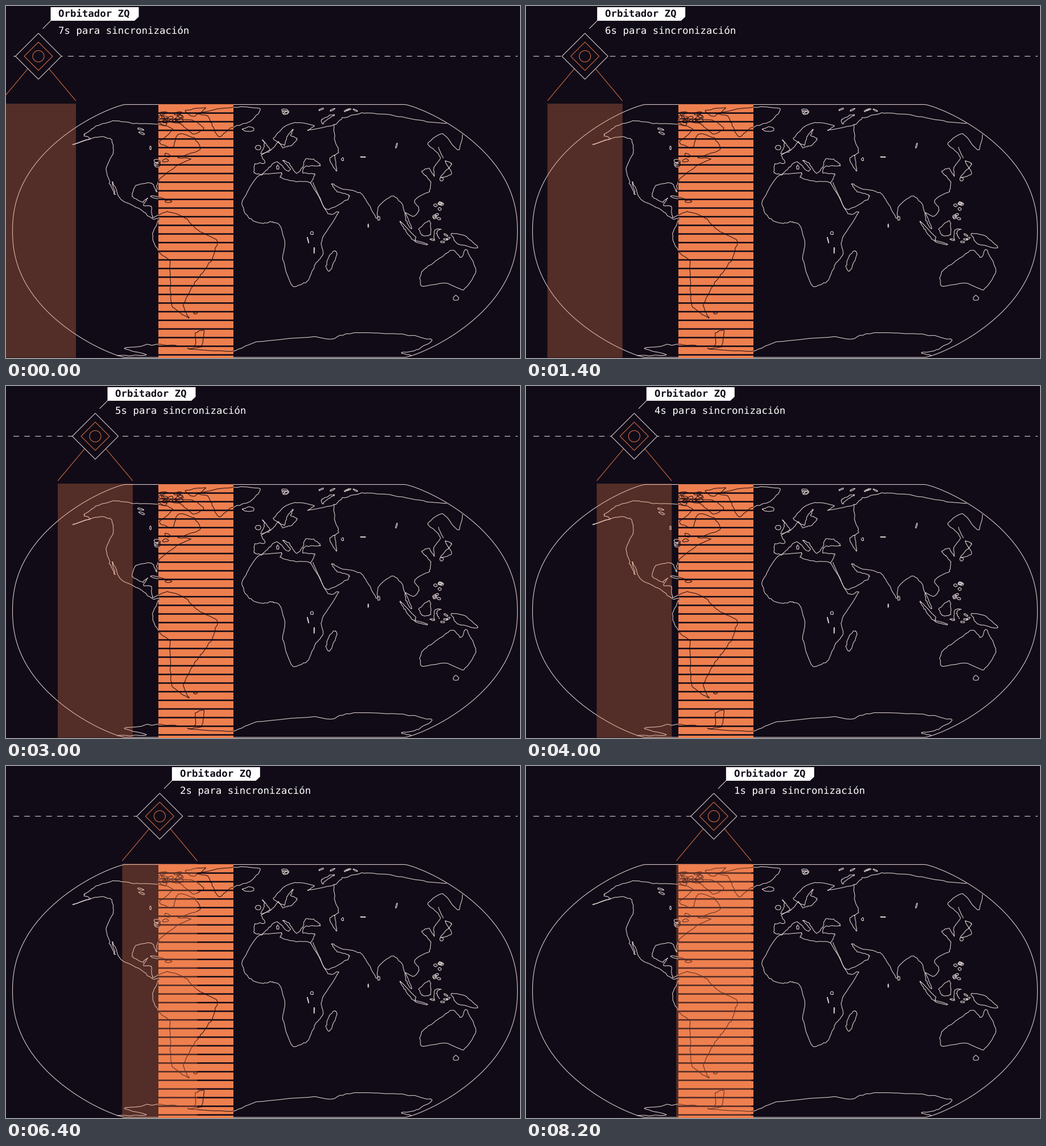
A matplotlib script that plays this animation: 904x620 px, repeating every 8400 ms.

```python
import numpy as np
import matplotlib.pyplot as plt
from matplotlib.animation import FuncAnimation
from matplotlib.collections import LineCollection
from matplotlib.patches import Circle, Polygon, Rectangle
from matplotlib.transforms import Affine2D

W, H, DPI = 904, 620, 64
FRAMES, STEP_MS = 42, 200
SPEED = 20 / 3            # pixels per frame
START_X, ORBIT_Y = 57, 88.5
BG, LIGHT, ORANGE, WHITE = "#110b17", "#d9cccb", "#ee7f4f", "#ffffff"
DARK, RUST = "#2a1518", "#cf6c42"
PT = 72 / DPI             # points per pixel
THIN = 1.1 * PT

plt.rcParams["text.hinting"] = "none"
rng = np.random.default_rng(4)

fig = plt.figure(figsize=(W / DPI, H / DPI), dpi=DPI, facecolor=BG)
ax = fig.add_axes([0, 0, 1, 1])
ax.set_xlim(0, W)
ax.set_ylim(H, 0)
ax.axis("off")

shores = []


def coast(*xy, closed=False, rough=0.55, n=7):
    """Run a smooth, slightly ragged shoreline through a few x, y key points."""
    p = np.array(xy, float).reshape(-1, 2)
    if closed:
        p = np.vstack([p[-1:], p, p[:2]])
    else:
        p = np.vstack([p[:1], p, p[-1:]])
    a, b, c, d = p[:-3, None], p[1:-2, None], p[2:-1, None], p[3:, None]
    t = np.linspace(0, 1, n, endpoint=False)[:, None]
    ease = t * t * (3 - 2 * t)
    line = (b + (c - b) * ease + 0.3 * (c - a) * t * (1 - t) ** 2
            - 0.3 * (d - b) * t * t * (1 - t)).reshape(-1, 2)
    line += rng.normal(0, rough, line.shape)
    shores.append(np.vstack([line, line[:1] if closed else p[-1:]]))


def isle(x, y, rx, ry, tilt=0):
    """Add a small irregular island or lake."""
    a = np.linspace(0, 2 * np.pi, 8, endpoint=False)
    r = rng.uniform(0.7, 1.15, 8)
    spot = Affine2D().rotate_deg(tilt).translate(x, y)
    ring = spot.transform(np.column_stack([rx * r * np.cos(a), ry * r * np.sin(a)]))
    coast(*ring.ravel(), closed=True, rough=0.15, n=3)


def scatter(count, x, y, w, h, rx, ry):
    """Spread islands over the box at x, y with size w, h."""
    for u, v in rng.random((count, 2)):
        isle(x + w * u, y + h * v, rx, ry, rng.uniform(-30, 30))


# Americas: Pacific side, then Atlantic side
coast(267, 208, 225, 206, 188, 203, 160, 211, 148, 219, 137, 227, 148, 234,
      117, 244, 158, 231, 184, 234, 189, 257, 176, 286, 184, 316, 192, 332,
      187, 309, 201, 339, 236, 358, 257, 375, 268, 375, 257, 405, 269, 434,
      288, 450, 289, 500, 293, 530, 322, 550)
coast(322, 550, 312, 528, 327, 496, 343, 474, 362, 447, 371, 413, 338, 395,
      312, 371, 284, 363, 258, 372, 255, 353, 242, 351, 249, 338, 239, 345,
      222, 335, 229, 316, 256, 312, 265, 327, 268, 308, 300, 281, 326, 269,
      303, 267, 342, 253, 330, 232, 303, 226, 292, 250, 270, 240, 293, 217,
      267, 208)
# Greenland and Arctic islands
coast(335, 189, 400, 178, 447, 181, 430, 203, 397, 214, 375, 231, 364, 212,
      355, 194, closed=True)
coast(297, 199, 330, 202, 348, 216, 330, 226, 312, 211, closed=True)
coast(316, 184, 352, 179, 330, 194, closed=True)
scatter(14, 270, 188, 40, 22, 7, 3)
isle(427, 217, 11, 4)
# Lakes, Caribbean, Falklands
scatter(2, 236, 213, 4, 14, 6, 1.5)
scatter(5, 264, 263, 20, 18, 6, 3)
isle(254, 250, 1.5, 4)
isle(267, 338, 13, 2, 12)
isle(286, 344, 6, 2)
isle(333, 541, 4, 1.5)
# Africa
coast(484, 294, 446, 298, 428, 320, 415, 350, 428, 374, 450, 383, 468, 380,
      482, 387, 491, 417, 487, 446, 504, 493, 530, 484, 544, 455, 557, 438,
      556, 410, 584, 364, 567, 366, 535, 312, 505, 309, 483, 302, closed=True)
coast(579, 431, 581, 441, 569, 467, 563, 460, 567, 443, closed=True)
isle(538, 400, 3, 3)
isle(531, 412, 0.6, 6, -15)
isle(542, 430, 0.6, 6)
# Mediterranean to the Arctic
coast(535, 312, 543, 296, 522, 294, 526, 283, 553, 281, 541, 270, 526, 270,
      522, 284, 511, 295, 497, 276, 487, 272, 500, 286, 494, 291, 478, 275,
      463, 284, 450, 297, 437, 293, 438, 278, 456, 276, 449, 263, 468, 252,
      479, 239, 487, 249, 503, 245, 512, 234, 501, 228, 505, 217, 494, 230,
      490, 245, 471, 233, 490, 212, 515, 205, 543, 211, 530, 219, 577, 209,
      592, 198, 630, 188, 690, 194, 740, 204, 775, 207)
coast(448, 260, 455, 245, 452, 236, 465, 254, closed=True)
isle(444, 249, 5, 5)
isle(478, 284, 2, 4)
scatter(3, 487, 184, 16, 4, 6, 2.5)
scatter(5, 540, 182, 76, 2, 5, 1.2)
coast(557, 208, 556, 199, 578, 191, 562, 202, closed=True)
# Urals, Caspian and inland lakes
coast(577, 209, 578, 235, 585, 257, 569, 269, 581, 291, 578, 262)
isle(592, 270, 2, 3)
isle(628, 266, 5, 0.8)
isle(687, 246, 1.2, 5, 15)
# Southern and eastern Asia
coast(540, 310, 563, 358, 599, 342, 603, 333, 583, 327, 573, 313, 590, 322,
      622, 328, 636, 346, 652, 374, 656, 353, 680, 334, 698, 352, 704, 380,
      714, 392, 703, 364, 717, 371, 727, 358, 718, 342, 744, 326, 747, 310,
      738, 299, 731, 291, 744, 286, 753, 300, 752, 285, 764, 266, 742, 242,
      768, 225, 796, 254, 803, 226)
coast(764, 302, 784, 296, 772, 273, 784, 277, 777, 287, closed=True)
isle(766, 305, 3, 3)
isle(656, 374, 2.5, 4)
isle(637, 387, 0.7, 3)
coast(760, 248, 769, 268)
# Islands of the south-east
scatter(10, 753, 347, 14, 32, 3.5, 2.5)
scatter(5, 750, 390, 30, 32, 4, 1.5)
coast(693, 380, 720, 406, 717, 413, 702, 394, closed=True)
isle(730, 417, 13, 1.5, 14)
coast(727, 392, 745, 378, 746, 403, 733, 404, closed=True)
coast(753, 412, 754, 394, 765, 393, 757, 399, 763, 410)
coast(783, 401, 808, 405, 830, 426, 797, 420, closed=True)
# Australia
coast(731, 469, 731, 493, 775, 488, 805, 500, 827, 467, 809, 428, 800, 443,
      785, 430, 755, 450, closed=True)
isle(791, 514, 5, 4)
# Antarctica
coast(195, 616, 248, 614, 208, 603, 265, 596, 331, 599, 333, 576, 348, 572,
      344, 600, 320, 604, 398, 608, 440, 592, 540, 583, 570, 587, 604, 576,
      690, 578, 750, 588, 722, 606, 695, 611, 713, 616)

# Globe outline: flat poles joined by rounded sides
t = np.sin(np.linspace(-np.pi / 2, np.pi / 2, 200))
half = 246 + 198 * (1 - np.abs(t) ** 2.2) ** 0.8
gx = np.r_[455.5 - half, (455.5 + half)[::-1]]
gy = 396.2 + 222.7 * np.r_[t, t[::-1]]
ax.add_patch(Polygon(np.column_stack([gx, gy]), fill=False, ec=LIGHT, lw=THIN))
ax.add_collection(LineCollection(shores, colors=LIGHT, linewidths=THIN))

# Striped target zone
zone = Rectangle((267.5, 172.5), 132.5, 447, fc=ORANGE, ec="none", zorder=3)
ax.add_patch(zone)
inked = LineCollection(shores, colors=DARK, linewidths=THIN, zorder=4)
ax.add_collection(inked)
inked.set_clip_path(zone)
for k in range(29):
    ax.add_patch(Rectangle((267.5, 187.3 + 15.21 * k), 132.5, 2.6,
                           fc=BG, ec="none", zorder=5, snap=False))

# Orbit
ax.plot([13, 900], [ORBIT_Y] * 2, color=LIGHT, lw=THIN, dash_capstyle="butt",
        ls=(0, (10 / 1.1, 9.2 / 1.1)), zorder=2, snap=False)

# Satellite, drawn around x = 0 and shifted as one group
shift = Affine2D()
moving = shift + ax.transData


def add(patch, z=7):
    patch.set_transform(moving)
    patch.set_zorder(z)
    ax.add_patch(patch)


def diamond(r, color):
    add(Polygon([(0, ORBIT_Y - r), (r, ORBIT_Y), (0, ORBIT_Y + r), (-r, ORBIT_Y)],
                fc=BG, ec=color, lw=THIN))


def stroke(x, y, color):
    ax.plot(x, y, color=color, lw=THIN, transform=moving, zorder=7)


add(Rectangle((-66, 172), 132, 447.5, fc=ORANGE, ec="none", alpha=0.3, snap=False), 6)
for side in (-1, 1):
    stroke([side * 19, side * 65.5], [111, 166.5], RUST)
diamond(40.5, LIGHT)
diamond(25, RUST)
add(Circle((0, ORBIT_Y), 10, fill=False, ec=RUST, lw=THIN))
stroke([8, 22], [39.5, 25.5], LIGHT)
add(Polygon([(21.5, 2), (176.5, 2), (176.5, 19), (169, 26), (21.5, 26)],
            fc=WHITE, ec="none"))
font = dict(family="DejaVu Sans Mono", size=17.4 * PT, va="baseline",
            transform=moving, zorder=8)
ax.text(35.5, 20, "Orbitador ZQ", color=BG, weight="bold", **font)
status = ax.text(35.5, 49.5, "", color=WHITE, **font)


def update(i):
    shift.clear().translate(START_X + SPEED * i, 0)
    status.set_text(f"{7 - i // 6}s para sincronización")
    return [status]


anim = FuncAnimation(fig, update, frames=FRAMES, interval=STEP_MS,
                     repeat=True, repeat_delay=0)
plt.show()
```
